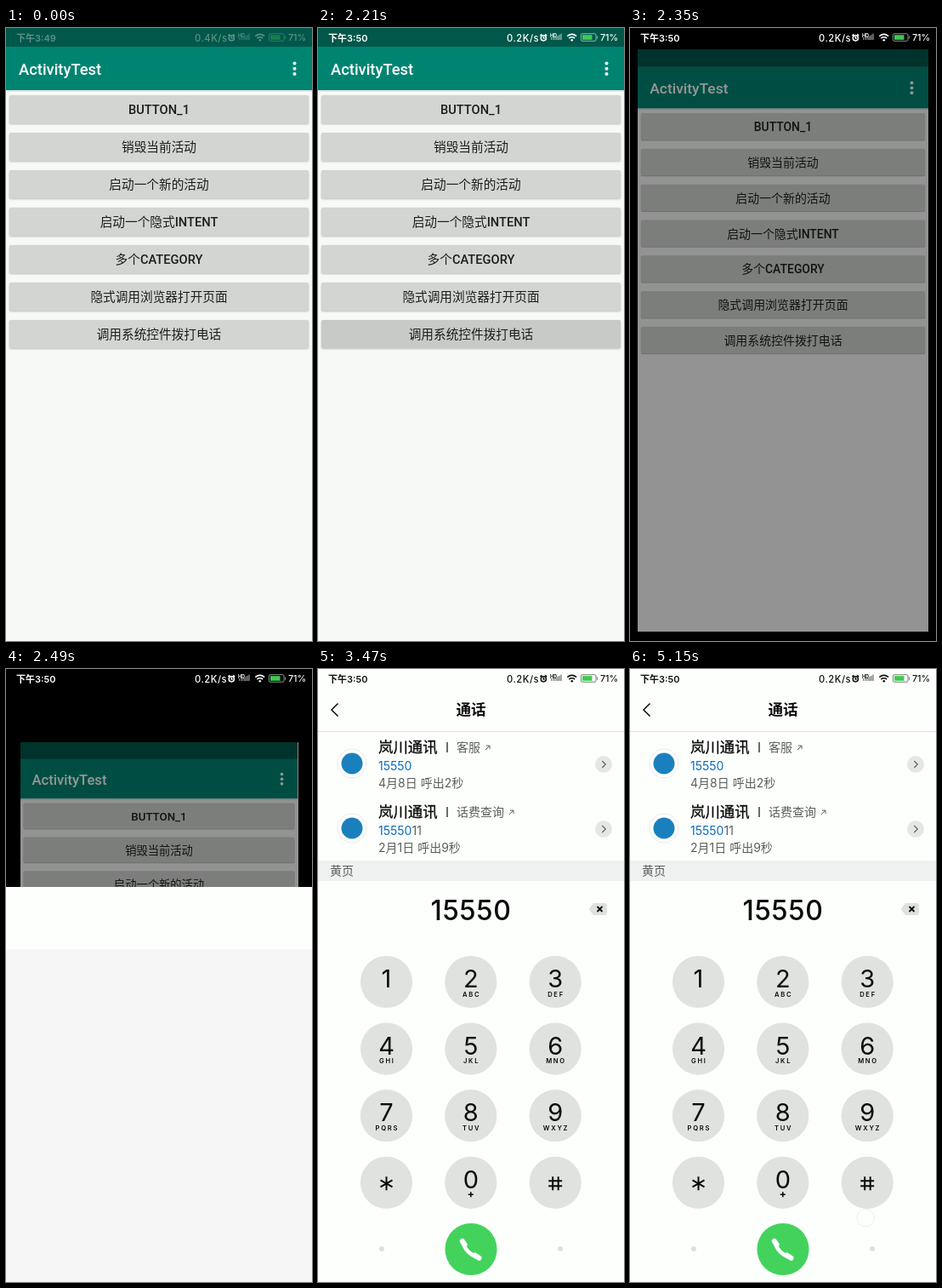
An HTML page that plays this animation: 360 by 720 pixels, repeating every 5220 ms.

```html
<!DOCTYPE html>
<html lang="zh">
<head>
<meta charset="utf-8">
<title>ActivityTest</title>
<style>
  html, body { margin: 0; width: 100%; height: 100%; overflow: hidden; background: #000; }
  svg { display: block; width: 360px; height: 720px; overflow: hidden; }
  text { font-family: Inter, "Noto Sans CJK SC", "Noto Sans CJK", sans-serif; fill: currentColor; white-space: pre; }
  #app text { font-family: Roboto, "Noto Sans CJK SC", "Noto Sans CJK", sans-serif; }
  #app tspan { font-weight: 500; }
  #app { color: #1c1e1c; }
  #page { color: #0a0b0a; }
  #app .title { fill: #fff; font-weight: 500; }
  .mid { text-anchor: middle; }
  .line { fill: none; stroke: currentColor; }
  .btn { filter: drop-shadow(0 1px .8px rgba(0, 0, 0, .25)); }
  .medium { stroke: currentColor; stroke-width: .3px; }
  .grey { color: #5c5e5c; fill: #5c5e5c; }
  .blue { fill: #0a6cc0; }
</style>
</head>
<body>
<svg id="stage" viewBox="0 0 360 720"></svg>
<script>
const LOOP = 5220, STEP = 70;

// Text placed by its left edge (or middle) and its optical centre line.
const text = (x, y, size, str, attrs = '') =>
  `<text x="${x}" y="${(y + size * .365).toFixed(2)}" font-size="${size}" ${attrs}>${str}</text>`;
const rect = (x, y, w, h, fill, attrs = '') =>
  `<rect x="${x}" y="${y}" width="${w}" height="${h}" fill="${fill}" ${attrs}/>`;
const dot = (x, y, r, fill, attrs = '') =>
  `<circle cx="${x}" cy="${y}" r="${r}" fill="${fill}" ${attrs}/>`;
const line = (d, width, attrs = '') =>
  `<path class="line" d="${d}" stroke-width="${width}" ${attrs}/>`;

function appScreen() {
  const labels = ['BUTTON_1', '销毁当前活动', '启动一个新的活动', '启动一个隐式INTENT',
    '多个CATEGORY', '隐式调用浏览器打开页面', '调用系统控件拨打电话'];
  const buttons = labels.map((label, i) => {
    const y = 79 + 44 * i;
    const str = label.replace(/[A-Z_0-9]+/, '<tspan>$&</tspan>');
    const press = i === 6 ? rect(4, y, 352, 33, '#c8cac7', 'id="press" rx="1.8"') : '';
    return rect(4, y, 352, 33, '#d3d5d2', 'class="btn" rx="1.8"') + press +
      text(180, y + 17, 14.67, str, 'class="mid"');
  });
  return rect(0, 0, 360, 720, '#f7f9f7') +
    rect(0, 73, 360, 2, '#000', 'opacity=".08"') +
    rect(0, 0, 360, 22, '#00574a') + rect(0, 22, 360, 51, '#008472') +
    text(15, 48.5, 18.33, 'ActivityTest', 'class="title"') +
    [41.5, 47.7, 53.9].map(y => dot(339.5, y, 2, '#fff')).join('') +
    buttons.join('');
}

function statusBar() {
  const bars = [0, 1, 2, 3].map(i => `M${280 + i * 2} 14V${10.5 - i * 1.3}`).join('');
  const speed = 'font-weight="500" letter-spacing=".5"';
  return text(12, 11.5, 11, '下午3:49', 'id="early" font-weight="600"') +
    text(12, 11.5, 11, '下午3:50', 'id="late" font-weight="600"') +
    text(222, 11.5, 11.2, '0.4K/s', `id="fast" ${speed}`) +
    text(222, 11.5, 11.2, '0.2K/s', `id="slow" ${speed}`) +
    line('M262.2 11.8a3.1 3.1 0 1 0 6.2 0a3.1 3.1 0 1 0 -6.2 0M265.3 10v2h1.4M261.4 9l2-1.8M269.2 9l-2-1.8', 1.5) +
    text(273, 8.5, 5.5, 'HD', 'font-weight="700"') + line('M275 14V11M277.6 14V11' + bars, 1, 'opacity=".75"') +
    line('M293.3 9.6q5.4-4.4 10.8 0M295.3 12q3.4-2.6 6.8 0', 1.6) + dot(298.7, 14.2, 1.3, 'currentColor') +
    line('M311 6.7h14.5q1.5 0 1.5 1.5v5.6q0 1.5-1.5 1.5h-14.5q-1.5 0-1.5-1.5v-5.6q0-1.5 1.5-1.5zM328.6 9.3v3.4', 1, 'opacity=".55"') +
    rect(311, 8.2, 11.5, 5.6, '#3dcb50') +
    text(332, 11.5, 10.7, '71%', 'font-weight="500"');
}

function contact(y, kind, kindWidth, rest, date) {
  const end = 163 + kindWidth + 6;
  return text(71, y - 19, 17.4, '岚川通讯', 'class="medium"') +
    line(`M152 ${y - 25}v12`, 1.2) +
    `<g class="grey">${text(163, y - 19, 14, kind)}` +
    line(`M${end} ${y - 16}l5-5m-4 0h4v4`, 1) +
    text(71, y + 23, 14, date) + '</g>' +
    text(71, y + 3, 14, `<tspan class="blue">15550</tspan><tspan class="grey">${rest}</tspan>`) +
    dot(336, y + 1, 10, '#e5e7e5') + line(`M334.3 ${y - 3}l4 4l-4 4`, 1.2, 'opacity=".6"');
}

const avatar = y => dot(40, y, 17, '#fff', 'stroke="#e3e7e8"') + dot(40, y, 12.5, '#1a80bd');

function keypad() {
  const letters = ['', 'ABC', 'DEF', 'GHI', 'JKL', 'MNO', 'PQRS', 'TUV', 'WXYZ'];
  const keys = [...'123456789*0#'].map((key, i) => {
    const x = [80.5, 179.8, 279.2][i % 3], y = 367.5 + 78.6 * Math.floor(i / 3);
    let face;
    if (key === '*') face = line(`M${x} ${y - 7}v16M${x - 7} ${y - 3}l14 8M${x + 7} ${y - 3}l-14 8`, 2);
    else if (key === '#') face = line(`M${x - 3} ${y - 7}v16M${x + 3.5} ${y - 7}v16M${x - 8} ${y - 2}h16M${x - 8} ${y + 4}h16`, 2);
    else face = text(x, y - 4, 29, key, 'class="mid"') + (key === '0'
      ? line(`M${x - 3} ${y + 14}h6m-3-3v6`, 1.6)
      : text(x + .8, y + 14.5, 7.6, letters[i], 'class="mid" font-weight="600" letter-spacing="1.7"'));
    return dot(x, y, 30.6, '#e0e2e0') + face;
  });
  const handset = line('M170.5 673q3 13 18 18.500', 4.5) +
    line('M169.800 672l2.800 4M184.500 688.500l5 3.300', 6);
  return keys.join('') +
    dot(75, 681, 3, '#dfe1df') + dot(285, 681, 3, '#dfe1df') + dot(180, 681.5, 30.6, '#43d35d') +
    `<g color="#fff" stroke-linecap="round" stroke-linejoin="round">${handset}</g>`;
}

function dialScreen() {
  const header = line('M23.5 40.500l-7.500 7.500l7.500 7.500', 1.5) +
    text(180, 48, 17.6, '通话', 'class="mid" font-weight="700"') +
    rect(0, 73, 360, 1, '#dfe1df');
  const input = rect(0, 225, 360, 24, '#eef1ef') + text(14, 237, 14, '黄页', 'class="grey"') +
    text(180, 283, 32, '15550', 'class="mid" font-weight="500" letter-spacing=".6"') +
    '<path d="M318.5 282l5.5-7h14q2 0 2 2v10q0 2-2 2h-14z" fill="#dfe1df"/>' +
    line('M328.5 279l6 6m0-6l-6 6', 1.8);
  return rect(0, 0, 360, 720, '#f5f6f5') + rect(0, 0, 360, 73, '#fdfffd') +
    `<g id="body">${rect(0, 73, 360, 647, '#fdfffd')}${input}${keypad()}</g>` +
    `<g id="head">${header}</g>` +
    `<g id="list">${contact(111, '客服', 28, '', '4月8日 呼出2秒')}${contact(187, '话费查询', 56, '11', '2月1日 呼出9秒')}</g>` +
    `<g id="faces">${avatar(111)}${avatar(187)}</g>` +
    dot(277.3, 644.7, 10.3, '#fff', 'id="touch" fill-opacity=".5" stroke="#dcdedc"');
}

document.getElementById('stage').innerHTML =
  rect(0, 0, 360, 720, '#000') +
  `<g id="app">${appScreen()}</g>` +
  rect(0, 0, 360, 720, '#000', 'id="dim"') +
  `<g id="page">${dialScreen()}</g><g id="status">${statusBar()}</g>`;

// Keys are [ms, value, easing]; a value holds until the next key by default.
function play(id, prop, keys) {
  const all = [...keys, [LOOP, keys[keys.length - 1][1]]];
  document.getElementById(id).animate(
    all.map(([ms, value, easing = 'step-end']) => ({ offset: ms / LOOP, [prop]: value, easing })),
    { duration: LOOP, iterations: Infinity });
}
const show = (id, ms) => play(id, 'opacity', [[0, 0], [ms, 1]]);
const hide = (id, ms) => play(id, 'opacity', [[0, 1], [ms, 0]]);
const ticks = (from, to, pose) =>
  Array.from({ length: (to - from) / STEP + 1 }, (_, i) => [from + i * STEP, pose(i)]);

play('status', 'opacity', [[0, .35], [470, .46, 'steps(5)'], [820, 1]]);
play('status', 'color', [[0, '#fff'], [2630, '#111']]);
hide('fast', 1370);
show('slow', 1370);
hide('early', 1930);
show('late', 1930);
play('press', 'opacity', [[0, 0], [2000, .3, 'steps(3)'], [2210, 1], [2280, 0]]);

// The list recedes and sinks while the dialer slides over it.
const place = (scale, top) => `translate(${180 * (1 - scale)}px, ${top}px) scale(${scale})`;
play('app', 'transform', [[0, place(1, 0)], [2280, place(.984, 7)], [2350, place(.95, 25)],
  [2420, place(.925, 53)], [2490, place(.906, 86)], [2560, place(.9, 110)]]);
play('dim', 'opacity', [[0, 0], [2280, .2], [2350, .41]]);
play('page', 'transform', [[0, 'translateY(720px)'],
  ...ticks(2350, 2910, i => `translateY(${Math.round(720 * (1 - i / 8) ** 3.6)}px)`)]);

show('head', 2630);
show('body', 2700);
show('list', 3050);
play('faces', 'opacity', [[0, 0], [3330, .35], [3400, .7], [3470, 1]]);
play('touch', 'opacity', [[0, 0], [4680, .9], [5150, .6]]);
</script>
</body>
</html>
```
